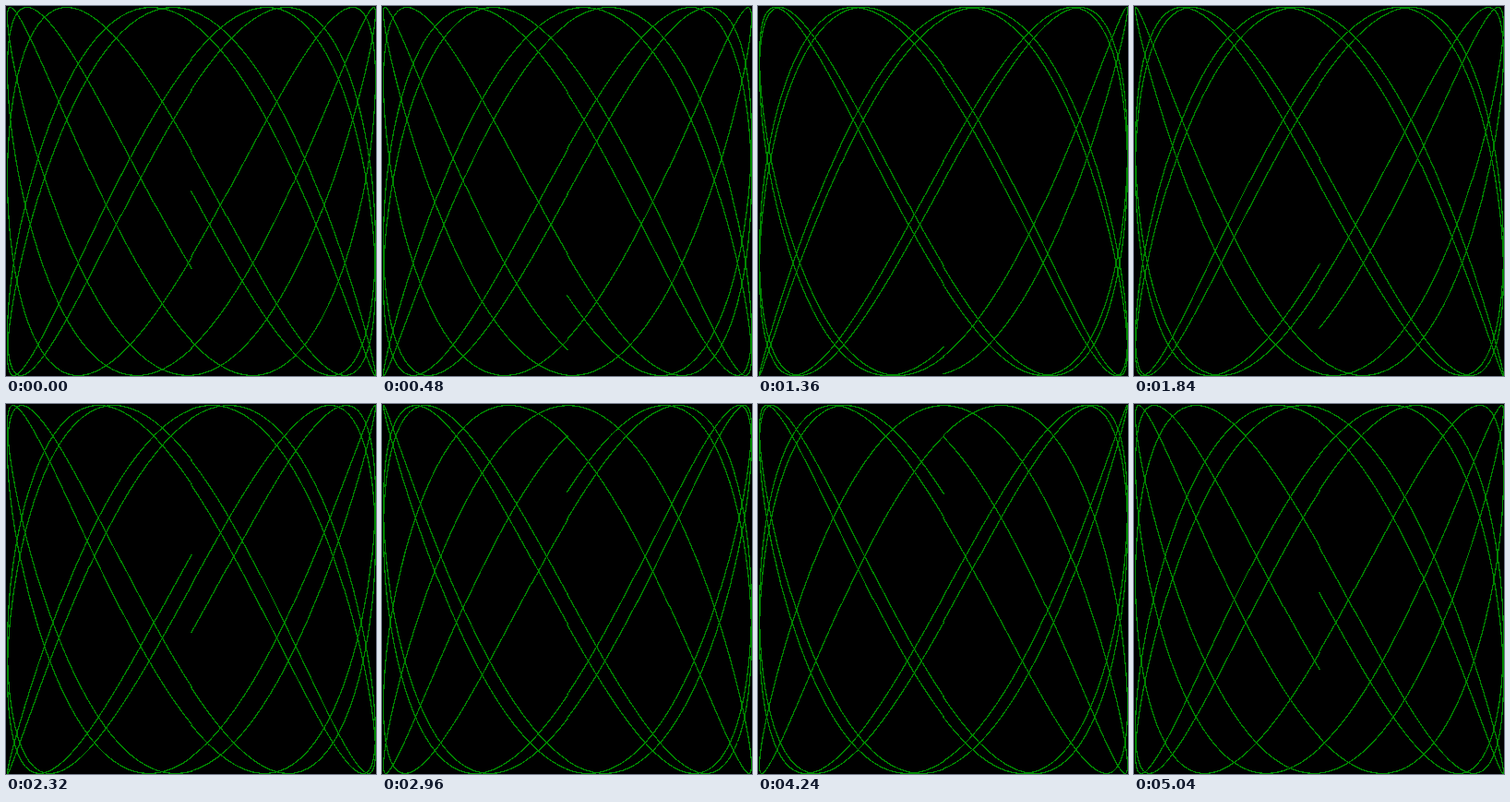
An HTML page without scripts that plays this animation: 401x401 px, repeating every 5120 ms.

```html
<!DOCTYPE html>
<html lang="en">
<head>
<meta charset="utf-8">
<title>Lissajous curve</title>
<style>
  @property --phase {
    syntax: "<number>";
    inherits: true;
    initial-value: 0;
  }

  html, body {
    margin: 0;
    width: 100%;
    height: 100%;
    overflow: hidden;
    background: #000;
  }

  svg {
    display: block;
    width: 100vw;
    height: 100vh;
    --freq: 1.8139;
    --h: calc(pi / 32);
    animation: turn 5120ms steps(64) infinite;
  }

  @keyframes turn {
    from { --phase: 0; }
    to { --phase: 6.4; }
  }

  /* x = sin t, y = sin(freq * t + phase). Each arc is the parabola (u, u²)
     mapped through the curve at t - h, t and t + h. */
  .arc {
    --t: calc((var(--k) + (var(--i) + .5) / 16) * pi);
    --w: calc(var(--freq) * var(--t) + var(--phase));
    --fh: calc(var(--freq) * var(--h));
    --x: sin(var(--t));
    --y: sin(var(--w));
    /* Negative coordinates truncate towards zero, one pixel inwards. */
    transform: matrix(
      calc(200 * cos(var(--t)) * sin(var(--h))),
      calc(200 * cos(var(--w)) * sin(var(--fh))),
      calc(200 * var(--x) * (cos(var(--h)) - 1)),
      calc(200 * var(--y) * (cos(var(--fh)) - 1)),
      calc(200.5 + 200 * var(--x) + clamp(0, -9999 * var(--x), 1)),
      calc(200.5 + 200 * var(--y) + clamp(0, -9999 * var(--y), 1))
    );
    fill: none;
    stroke: #080;
    stroke-width: 1.25px;
    vector-effect: non-scaling-stroke;
    shape-rendering: crispEdges;
  }
</style>
</head>
<body>
<svg viewBox="0 0 401 401">
  <defs>
    <path id="arc" class="arc" d="M-1 1Q0 -1 1 1"/>
    <g id="sweep">
      <use href="#arc" style="--i:0"/>
      <use href="#arc" style="--i:1"/>
      <use href="#arc" style="--i:2"/>
      <use href="#arc" style="--i:3"/>
      <use href="#arc" style="--i:4"/>
      <use href="#arc" style="--i:5"/>
      <use href="#arc" style="--i:6"/>
      <use href="#arc" style="--i:7"/>
      <use href="#arc" style="--i:8"/>
      <use href="#arc" style="--i:9"/>
      <use href="#arc" style="--i:10"/>
      <use href="#arc" style="--i:11"/>
      <use href="#arc" style="--i:12"/>
      <use href="#arc" style="--i:13"/>
      <use href="#arc" style="--i:14"/>
      <use href="#arc" style="--i:15"/>
    </g>
  </defs>
  <use href="#sweep" style="--k:0"/>
  <use href="#sweep" style="--k:1"/>
  <use href="#sweep" style="--k:2"/>
  <use href="#sweep" style="--k:3"/>
  <use href="#sweep" style="--k:4"/>
  <use href="#sweep" style="--k:5"/>
  <use href="#sweep" style="--k:6"/>
  <use href="#sweep" style="--k:7"/>
  <use href="#sweep" style="--k:8"/>
  <use href="#sweep" style="--k:9"/>
</svg>
</body>
</html>
```
